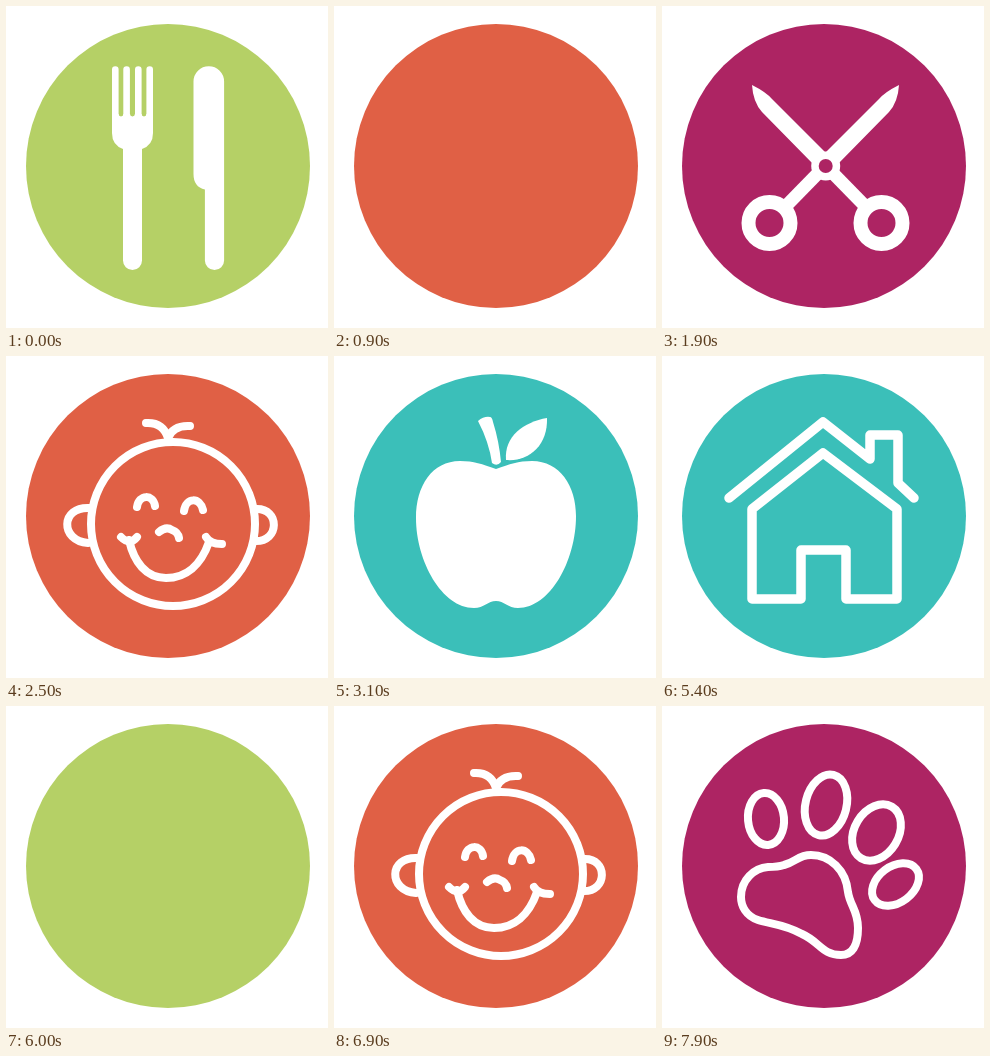
An HTML page for the animation above (8 s loop, 322 px wide and 322 px high).

```html
<!DOCTYPE html>
<html lang="en">
<head>
<meta charset="utf-8">
<title>Icon cycle</title>
<style>
  html, body { margin: 0; width: 100%; height: 100%; overflow: hidden; background: #fff; }
  svg { display: block; width: 100%; height: 100%; }
  g { display: none; }
  .on, .on g { display: inline; }
  .solid { fill: #fff; }
  .line { fill: none; stroke: #fff; stroke-width: 8; stroke-linecap: round; stroke-linejoin: round; }
</style>
</head>
<body>
<svg viewBox="0 0 322 322">
  <circle id="disc" cx="162" cy="160" r="142"/>

  <g id="cutlery" class="solid">
    <path class="line" style="stroke-width:6.6" d="M109.3 63.5V112M120.6 63.5V112M132.3 63.5V112M143.7 63.5V112"/>
    <path d="M106 108h6.6a2.4 2.4 0 0 0 4.8 0h6.6a2.4 2.4 0 0 0 4.9 0h6.7a2.4 2.4 0 0 0 4.8 0H147V127Q147 139 136 143V254.5a9.5 9.5 0 0 1-19 0V143Q106 139 106 127Z"/>
    <path d="M187.5 75.5a15.3 15.3 0 0 1 30.6 0V254.4a9.6 9.6 0 0 1-19.2 0V183.5Q187.5 181 187.5 168Z"/>
  </g>

  <g id="house" class="line" style="stroke-width:9.5">
    <path d="M67 142L161 66L208 103V79H236V127L252 142"/>
    <path d="M161 97L235 153V243H184V194H139V243H90V153Z"/>
  </g>

  <g id="scissors" class="solid">
    <g id="half">
      <path d="M90 79Q104 86 110 93L164 147L152 159L100 106Q91 96 90 79Z"/>
      <path class="line" style="stroke-width:13;stroke-linecap:butt" d="M160 156L204 201"/>
      <circle class="line" style="stroke-width:14" cx="107.5" cy="217" r="21"/>
    </g>
    <use href="#half" transform="matrix(-1 0 0 1 327 0)"/>
    <circle cx="163.7" cy="160" r="14.5"/>
    <circle cx="163.7" cy="160" r="7" fill="#ad2463"/>
  </g>

  <g id="face" class="line">
    <circle cx="167" cy="168" r="82"/>
    <path d="M84 152C54 150 54 185 82 187M250 153C274 152 274 186 249 185"/>
    <path d="M140 67Q157 66 162 82Q167 69 184 70"/>
    <path d="M131 151C133 138 147 138 149 150M178 155C180 141 194 141 197 154"/>
    <path d="M153 176Q160 170 166 174Q172 176 173 182"/>
    <path d="M123 184C128 206 140 222 160 222C180 222 195 209 203 186"/>
    <path d="M115 181Q124 190 131 181M200 181Q204 188 216 188"/>
  </g>

  <g id="apple" class="solid">
    <path d="M162 113C148 108 140 105 126 105C98 105 82 130 82 162C82 205 108 252 140 252C150 252 154 245 162 245C170 245 174 252 184 252C216 252 242 205 242 160C242 130 226 105 198 105C184 105 176 108 162 113Z"/>
    <path d="M144 65Q150 60 156 61Q158 61 159 66Q165 85 167 106Q163 111 158 107Q155 86 144 65Z"/>
    <path d="M172 104C170 80 190 66 213 62C214 90 194 106 172 104Z"/>
  </g>

  <g id="paw" class="line">
    <ellipse rx="18" ry="26" transform="translate(104 113) rotate(-5)"/>
    <ellipse rx="20.5" ry="31" transform="translate(164 99) rotate(14)"/>
    <ellipse rx="22" ry="30" transform="translate(214.5 126.5) rotate(31)"/>
    <ellipse rx="18" ry="26" transform="translate(233.5 178.5) rotate(53)"/>
    <path d="M122 159C134 156 136 149 149 149C168 149 184 164 186 186C188 200 196 204 196 222C196 240 190 249 179 249C160 249 158 236 140 228C122 218 108 218 96 214C84 210 79 200 79 191C79 174 92 162 106 161C112 161 116 161 122 159Z"/>
  </g>
</svg>
<script>
  const SLOT = 500;
  const colors = ['#b5d066', '#e06045', '#3bbfb9', '#ad2463'];
  // An empty name shows the plain disc.
  const icons = ['cutlery', '', 'house', 'scissors', '', 'face', 'apple', 'paw'];
  const disc = document.getElementById('disc');
  const groups = document.querySelectorAll('svg > g');
  const start = performance.now();
  let shown = -1;

  function draw() {
    const slot = Math.floor((performance.now() - start) / SLOT) % icons.length;
    if (slot !== shown) {
      shown = slot;
      disc.setAttribute('fill', colors[slot % colors.length]);
      groups.forEach(g => g.classList.toggle('on', g.id === icons[slot]));
    }
    requestAnimationFrame(draw);
  }
  draw();
</script>
</body>
</html>
```
